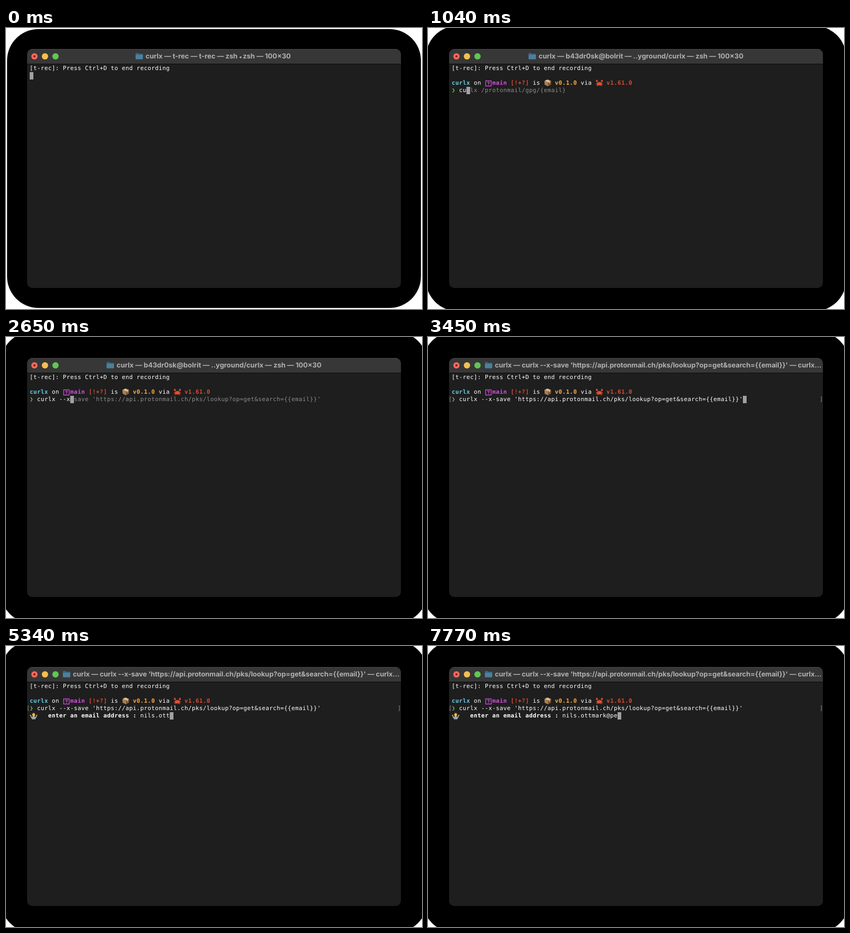
These frames come from a looping animation (790x535 px, 8000 ms). An HTML page:

```html
<!DOCTYPE html>
<html lang="en">
<head>
<meta charset="utf-8">
<title>Terminal</title>
<style>
  html, body { margin: 0; width: 100%; height: 100%; overflow: hidden; background: #fff; }
  #stage { position: relative; width: 790px; height: 535px; overflow: hidden; background: #fff; }
  #stage * { position: absolute; }
  #shade { inset: 2px; border-radius: 60px; background: #000; }
  #window { left: 40px; top: 40px; width: 710px; height: 455px; border-radius: 10px; background: #1e1e1e; overflow: hidden; }
  #bar { left: 0; top: 0; width: 710px; height: 28px; background: #373737; box-shadow: inset 0 1px #4b4b4b, 0 1px #0a0a0a; }
  .light { top: 8px; width: 12px; height: 12px; border-radius: 50%; }
  .light i { left: 4px; top: 4px; width: 4px; height: 4px; border-radius: 50%; background: #84150e; }
  #name { top: 0; display: flex; font: 700 13px/28px Inter, "Open Sans", sans-serif; color: #b1b1b1; white-space: pre; text-rendering: geometricPrecision; }
  #name svg { left: -19px; top: 7px; }
  #name span { position: static; }
  #name small { position: static; font-size: 8px; }
  .t { font: 11px/14px "DejaVu Sans Mono", "DejaVu Sans", monospace; letter-spacing: calc(7px - 1ch); height: 14px; color: #fff; white-space: pre; text-rendering: geometricPrecision; }
  .b { font-weight: 700; }
  .cyan { color: #68cbdc; }
  .pink { color: #d24fdc; }
  .red { color: #d24b33; }
  .gold { color: #f3aa43; }
  .green { color: #62c83e; }
  .dim { color: #8b8b8b; }
  #cursor { width: 7px; height: 14px; background: #a1a1a1; }
</style>
</head>
<body>
<div id="stage">
  <div id="shade"></div>
  <div id="window">
    <div id="bar">
      <b class="light" style="left:8px;background:#ed6a5e"><i></i></b>
      <b class="light" style="left:28px;background:#f5bf4f"></b>
      <b class="light" style="left:48px;background:#61c554"></b>
      <div id="name">
        <svg width="14" height="13" viewBox="0 0 14 13">
          <path d="M0 2Q0 .5 1.500 .5H5L6.500 2H12.500Q14 2 14 3.500V11Q14 12.500 12.500 12.500H1.500Q0 12.500 0 11Z" fill="#376581"/>
          <path d="M0 4H14V11Q14 12.500 12.500 12.500H1.500Q0 12.500 0 11Z" fill="#4b7f9d"/>
        </svg>
        <span id="label"></span>
      </div>
    </div>
  </div>
  <div id="text"></div>

  <div id="prompt">
    <svg style="left:108px;top:99px" width="14" height="13" viewBox="0 0 14 13">
      <rect x="1.500" y="1.500" width="10.500" height="10" fill="none" stroke="#d24fdc" stroke-width="1.300"/>
      <path d="M4.800 4.900Q5 3.600 6.700 3.600T8.500 5Q8.500 5.900 6.800 6.900V7.900M6.800 8.900V10.200" fill="none" stroke="#d24fdc" stroke-width="1.300"/>
    </svg>
    <svg style="left:220px;top:97px" width="15" height="15" viewBox="0 0 15 15">
      <path d="M1 4L7 1L14 4L8 7Z" fill="#d3ad7d"/>
      <path d="M1 4L8 7V14L1.500 11Z" fill="#ad7f50"/>
      <path d="M8 7L14 4L13.500 11L8 14Z" fill="#7c5636"/>
      <path d="M3.500 2.800L5 2L11.500 5.300V8L10 8.500V6Z" fill="#e6d2ac"/>
    </svg>
    <svg style="left:318px;top:97px" width="15" height="15" viewBox="0 0 15 15">
      <g fill="none" stroke="#c93d27" stroke-width="1.300">
        <path d="M4 6L2 5M11 6L13 5M4 9L1 9M11 9H14M4 10.500L1.500 12M11 10.500L13.500 12M5 11.500L3.500 13.500M10 11.500L11.500 13.500"/>
      </g>
      <path d="M1 5Q0 2 4 1L3 3L5 3Q4.500 6 1 5ZM14 5Q15 2 11 1L12 3L10 3Q10.500 6 14 5Z" fill="#dc5136"/>
      <ellipse cx="7.500" cy="9" rx="4.500" ry="3.500" fill="#dc5136"/>
      <circle cx="6" cy="5.500" r=".9" fill="#351a16"/><circle cx="9" cy="5.500" r=".9" fill="#351a16"/>
    </svg>
  </div>

  <div id="ask">
    <svg style="left:45px;top:126px" width="15" height="14" viewBox="0 0 15 14">
      <path d="M2 7L4.500 9L6 8H9L10.500 9L13 7L13.500 9L11 12V13.500H4V12L1.500 9Z" fill="#9fa9ab"/>
      <path d="M0 5L3 5.500L3 7.500L1.500 7.500ZM15 5L12 5.500V7.500L13.500 7.500Z" fill="#eebd45"/>
      <path d="M4.500 6Q3.800 1 7.500 1T10.500 6Z" fill="#75502f"/>
      <ellipse cx="7.500" cy="5.300" rx="2.400" ry="3" fill="#f0c24c"/>
    </svg>
  </div>
  <div id="cursor"></div>
</div>

<script>
const $ = id => document.getElementById(id);
const LOOP = 8000;
const SHORT = "curlx /protonmail/gpg/{email}";
const SAVE = "curlx --x-save 'https://api.protonmail.ch/pks/lookup?op=get&search={{email}}'";
const MAIL = "nils.ottmark@";

const titles = [
  { x: 265, html: "curlx — t-rec — t-rec — zsh <small>◂</small> zsh — 100×30" },
  { x: 210, html: "curlx — b43dr0sk@bolrit — ..yground/curlx — zsh — 100×30" },
  { x: 127, html: "curlx — " + SAVE.replace("&", "&amp;") + " — curlx…", gap: "-.07px" }
];

// [start ms, edge inset, title, typed command length, mail text]
const steps = [
  [0, 2, 0], [250, 0, 0],
  [510, -2, 1, 0], [780, -3, 1, 1], [1040, -4, 1, 2], [1300, -5.5, 1, 3],
  [1570, -7, 1, 4], [1840, -8.5, 1, 5], [2110, -10, 1, 6],
  [2380, -10, 1, 8], [2650, -10, 1, 9], [2920, -10, 1, 10],
  [3190, -10, 1, SAVE.length], [3450, -10, 2, SAVE.length]
];
const addMail = (ms, text) => steps.push([ms, -10, 2, SAVE.length, text]);
[0, 1, 2, 3, 5, 6, 8, 9, 10, 12, 13].forEach((n, i) => addMail(3720 + 270 * i, MAIL.slice(0, n)));
["p", "pt", "pte", "p", "pe"].forEach((end, i) => addMail(6690 + 270 * i, MAIL + end));

function place(el, col, row) {
  el.style.left = 45 + 7 * col + "px";
  el.style.top = 70 + 14 * row + "px";
}
function write(parent, col, row, text, cls = "") {
  const el = document.createElement("span");
  el.className = "t " + cls;
  el.textContent = text;
  place(el, col, row);
  parent.append(el);
  return el;
}
const show = (el, on) => el.style.visibility = on ? "visible" : "hidden";

const prompt = $("prompt"), ask = $("ask"), cursor = $("cursor");
write($("text"), 0, 0, "[t-rec]: Press Ctrl+D to end recording");
write(prompt, 0, 2, "curlx", "b cyan");
write(prompt, 6, 2, "on");
write(prompt, 11, 2, "main", "b pink");
write(prompt, 16, 2, "[!+?]", "b red");
write(prompt, 22, 2, "is");
write(prompt, 28, 2, "v0.1.0", "b gold");
write(prompt, 35, 2, "via");
write(prompt, 42, 2, "v1.61.0", "b red");
write(prompt, 0, 3, "❯", "b green");
const command = write(prompt, 2, 3, "");
const hint = write(prompt, 2, 3, "", "dim");
write(ask, 5, 4, "enter an email address :", "b");
const mailText = write(ask, 30, 4, "");
const marks = [write($("text"), -0.85, 3, "[", "dim"), write($("text"), 99.8, 3, "]", "dim")];

function draw([, edge, title, typed, mail]) {
  const { x, html, gap = "normal" } = titles[title];
  $("shade").style.inset = edge + "px";
  $("name").style.left = x - 40 + "px";
  $("label").innerHTML = html;
  $("label").style.letterSpacing = gap;

  const ready = typed !== undefined, asking = mail !== undefined;
  show(prompt, ready);
  show(ask, asking);
  marks.forEach(m => show(m, title === 2));

  if (ready) {
    const full = typed > 6 ? SAVE : SHORT;
    command.textContent = full.slice(0, typed);
    hint.textContent = typed ? full.slice(typed + 1) : "";
    place(hint, 3 + typed, 3);
  }
  if (asking) {
    mailText.textContent = mail;
    place(cursor, 30 + mail.length, 4);
  } else if (ready) {
    place(cursor, 2 + typed, 3);
  } else {
    place(cursor, 0, 1);
  }
}

let current;
const start = performance.now();
function tick(now) {
  const t = Math.max(0, now - start) % LOOP;
  const step = steps.findLast(s => s[0] <= t);
  if (step !== current) draw(current = step);
  requestAnimationFrame(tick);
}
tick(start);
</script>
</body>
</html>
```
